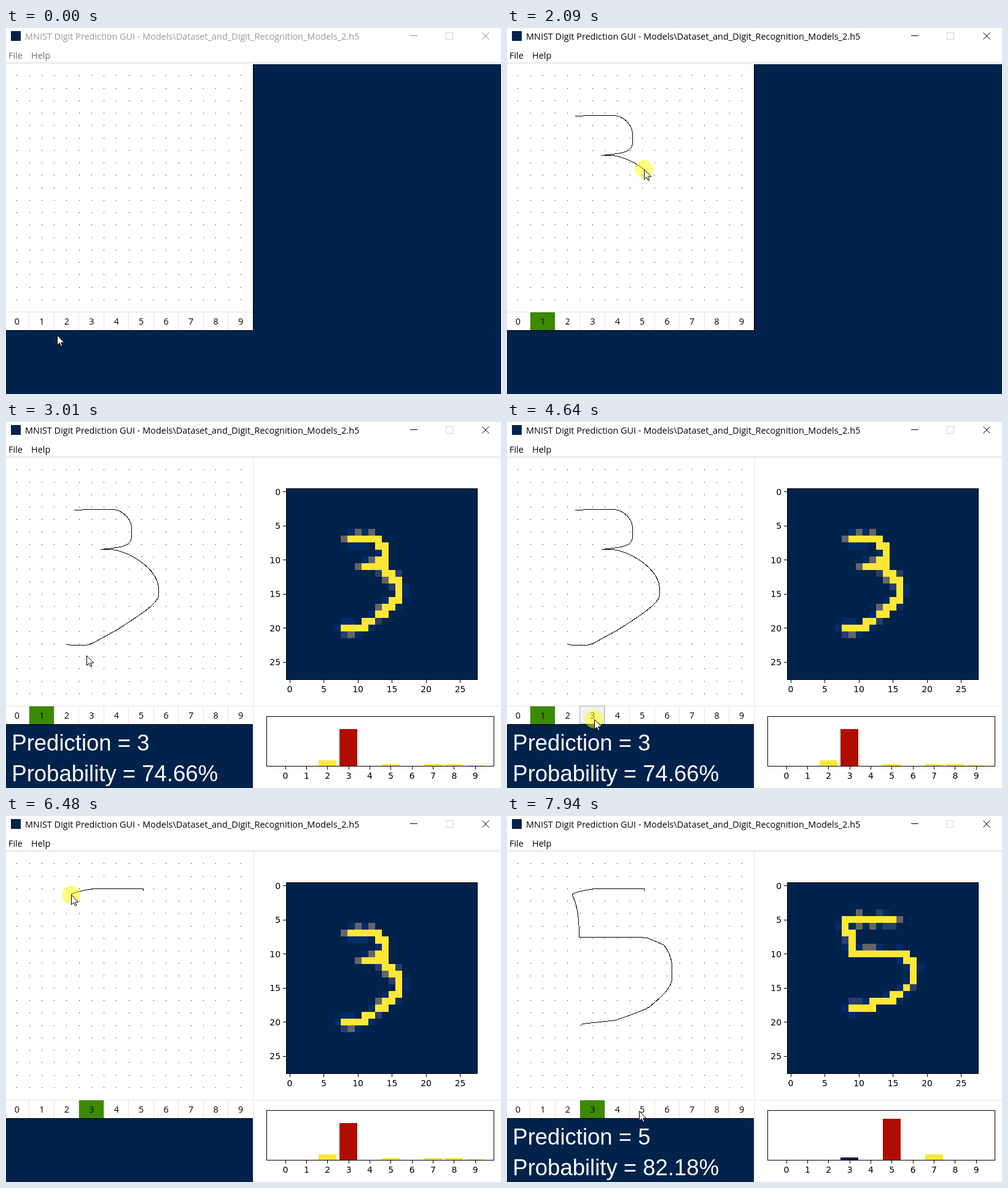
An HTML page for the animation above (8000 ms loop, 806x596 px).

```html
<!DOCTYPE html>
<html lang="en">
<head>
<meta charset="utf-8">
<title>Digit Prediction</title>
<style>
html, body { margin: 0; width: 100%; height: 100%; overflow: hidden; background: #fff; }
svg { display: block; width: 806px; height: 596px; }
.crisp { shape-rendering: crispEdges; }
.ui { font: 14.45px "Open Sans", "Noto Sans", sans-serif; }
.plot text { font: 13.9px "DejaVu Sans", sans-serif; }
.result { font: 36.5px "Liberation Sans", Arial, sans-serif; fill: #fff; }
</style>
</head>
<body>
<svg viewBox="0 0 806 596">
  <rect width="806" height="596" fill="#fff"/>
  <rect y="55" width="806" height="4" fill="#f0f0f0"/>
  <rect y="59" width="806" height="537" fill="#00224b"/>
  <rect class="crisp" x="8" y="5" width="16" height="16" fill="#00224b"/>
  <g class="ui">
    <text id="caption" x="31" y="19">MNIST Digit Prediction GUI - Models\Dataset_and_Digit_Recognition_Models_2.h5</text>
    <g id="menu"><text x="4" y="50">File</text><text x="41" y="50">Help</text></g>
  </g>
  <g id="buttons" fill="none">
    <path class="crisp" d="M658 12.5h12"/>
    <path d="M775.5 7.5l11 11m0 -11l-11 11"/>
  </g>
  <rect class="crisp" x="716.5" y="7.5" width="11" height="11" fill="none" stroke="#d4d4d4"/>
  <g class="crisp">
    <rect y="59" width="403" height="434" fill="#000"/>
    <rect y="59" width="402" height="433" fill="#fff"/>
    <g id="dots"></g>
    <path id="grid" fill="none" stroke="#e3e3e3"/>
    <rect id="chosen" y="463" width="40" height="29" fill="#3c8a00"/>
    <rect id="pressed" y="462.5" width="40" height="29" fill="#f0f0f0" stroke="#b0b0b0"/>
  </g>
  <g id="labels" class="ui"></g>
  <g id="panel" class="plot">
    <g class="crisp">
      <rect x="402" y="59" width="404" height="537" fill="#f0f0f0"/>
      <rect x="404" y="59" width="402" height="403" fill="#fff"/>
      <rect x="404" y="464" width="402" height="132" fill="#fff"/>
      <rect x="457" y="109" width="311" height="311" fill="#00224b"/>
      <g id="heat"></g>
      <g id="bars"></g>
      <path id="ticks" fill="none" stroke="#000"/>
    </g>
    <g id="tickText"></g>
  </g>
  <g id="result" class="result">
    <text id="guess" x="9.3" y="535"></text>
    <text id="chance" x="9.3" y="585"></text>
  </g>
  <g id="ink" class="crisp" fill="none" stroke="#000" transform="translate(.5 .5)"></g>
  <g id="pointer">
    <circle id="halo" r="15" fill="#ff0" opacity=".5"/>
    <path d="M.5 .5V16.5L4.2 13L6.8 18.4L9 17.4L6.5 12.2H11.8Z" fill="#fff" stroke="#000"/>
  </g>
</svg>
<script>
const LOOP = 8000, BEAT = 77;
const YELLOW = "#ffe737", NAVY = "#00224b", RED = "#b10c00";
const $ = id => document.getElementById(id);
const set = (id, name, value) => $(id).setAttribute(name, value);
const show = (id, on) => set(id, "visibility", on ? "visible" : "hidden");
const fillWith = (id, n, make) => { $(id).innerHTML = Array.from({ length: n }, (_, i) => make(i)).join(""); };
const rect = (x, y, w, h, fill = "#000") =>
  `<rect x="${x}" y="${y}" width="${w}" height="${h}" fill="${fill}"/>`;
const label = (x, y, s, anchor = "middle") =>
  `<text x="${x}" y="${y}" text-anchor="${anchor}">${s}</text>`;
const within = (t, [a, b]) => t >= a && t < b;
const cellLeft = i => Math.floor(40.5 * i - 2.7);

// Each result's heat map is its own stroke fitted into the box of cells.
const THREE = {
  digit: 3, chance: "74.66%", label: 1, cells: [8.5, 7.5, 16.5, 20.5],
  bars: { 1: .005, 2: .115, 3: .7466, 5: .042, 7: .042, 8: .042, 9: .015 }
};
const FIVE = {
  digit: 5, chance: "82.18%", label: 3, cells: [8.5, 5.5, 18.5, 18.5],
  bars: { 3: .05, 5: .8218, 7: .115 }
};

// Pointer moves: start, end, path from the last point, digit being drawn.
let end = "83 500";
const MOVES = [
  [80, 310, "L41 488L48 480"],
  [860, 1170, "Q80 160 113 142"],
  [1400, 1400, "L111 143"],
  [1477, 1860, "L136 142H172C190 142 204 158 204 173V186C204 203 184 204 154 207", 3],
  [2010, 2090, "H172C192 210 210 220 223 230", 3],
  [2165, 2630, "C238 242 248 256 248 272V282C246 296 216 315 180 338L140 360L130 363H108L99 362", 3],
  [2857, 3010, "L131 380"],
  [3088, 3320, "L158 445"],
  [3700, 4330, "Q205 500 178 498T142 484"],
  [4880, 5640, "Q160 290 204 173"],
  [5720, 5950, "L223 121"],
  [6030, 6480, "V118H150C131 118 118 122 107 126L106 128", 5],
  [6560, 7330, "C114 145 117 165 117 197H214L228 198L254 209C263 218 268 232 268 246V266C266 282 248 296 232 310C215 320 195 325 177 332L150 335L122 338L119 341", 5],
  [7490, 7940, "L215 480"]
].map(([from, to, d, digit]) => {
  const path = document.createElementNS("http://www.w3.org/2000/svg", "path");
  path.setAttribute("d", `M${end}${d}`);
  $("ink").append(path);
  const length = path.getTotalLength();
  const at = s => { const p = path.getPointAtLength(s * length); return [p.x, p.y]; };
  end = at(1).join(" ");
  return { from, to, path, length, at, digit, steps: Math.round((to - from) / BEAT) + 1 };
});
const PRESSES = [[540, 630], [1477, 2780], [4640, 4710], [6030, 7410]];

function buildStatic() {
  const dot = i => Math.floor(17.8 + 20.25 * i);
  fillWith("dots", 361, i => rect(dot(i % 19), dot(Math.floor(i / 19)) + 60, 1, 1));
  fillWith("labels", 10, i => label(18 + 40.45 * i, 483, i));
  let lines = "M0 462.5H402";
  for (let i = 1; i < 10; i++) lines += `M${cellLeft(i) + .5} 462V492`;
  set("grid", "d", lines);

  let d = "M456.5 108.5H767.5V419.5H456.5ZM424.5 479.5H794.5V560.5H424.5Z", text = "";
  for (let v = 0; v <= 25; v += 5) {
    const x = 462 + v * 11.1, y = 113.5 + v * 11.1;
    d += `M${Math.floor(x) + .5} 420v5M456 ${Math.floor(y) + .5}h-5`;
    text += label(x, 440, v) + label(447, y + 5, v, "end");
  }
  for (let i = 0; i < 10; i++) {
    const x = 455 + 34.35 * i;
    d += `M${Math.floor(x) + .5} 561v5`;
    text += label(x, 581, i);
  }
  set("ticks", "d", d);
  $("tickText").innerHTML = text;
}

// Stroke samples scaled from their bounding box to heat map cells.
function cellPoints({ digit, cells: [x0, y0, x1, y1] }) {
  const pts = MOVES.filter(m => m.digit === digit).flatMap(m => {
    const n = Math.ceil(m.length / 3);
    return Array.from({ length: n + 1 }, (_, i) => m.at(i / n));
  });
  const fit = (axis, lo, hi) => {
    const v = pts.map(p => p[axis]), min = Math.min(...v), max = Math.max(...v);
    return v.map(a => lo + (a - min) / (max - min) * (hi - lo));
  };
  const ys = fit(1, y0, y1);
  return fit(0, x0, x1).map((x, i) => [x, ys[i]]);
}

const noise = n => { const v = Math.sin(n * 12.9898) * 43758.5453; return v - Math.floor(v); };

function heatColor(distance, seed) {
  if (distance < .58) return YELLOW;
  const v = noise(seed);
  if (distance > 1.1 || v < .3) return "";
  return v < .65 ? "#002b68" : v < .86 ? "#293e6c" : "#666368";
}

let shown = null;
function drawResult(r) {
  if (!r || r === shown) return;
  shown = r;
  const pts = cellPoints(r);
  const px = c => Math.round(456.5 + 11.1 * c), py = c => Math.round(107.6 + 11.1 * c);
  fillWith("heat", 784, i => {
    const col = i % 28, row = Math.floor(i / 28);
    const near = Math.min(...pts.map(([x, y]) => Math.hypot(x - col - .5, y - row - .5)));
    const fill = heatColor(near, i);
    return fill && rect(px(col), py(row), px(col + 1) - px(col), py(row + 1) - py(row), fill);
  });
  fillWith("bars", 10, i => {
    if (!r.bars[i]) return "";
    const h = Math.ceil(r.bars[i] * 81 + .5);
    const fill = i === r.digit ? RED : i === r.label ? NAVY : YELLOW;
    return rect(Math.floor(440.8 + 34.35 * i), 561 - h, 29, h, fill);
  });
  $("guess").textContent = "Prediction = " + r.digit;
  $("chance").textContent = "Probability = " + r.chance;
}

function drawPointer(t) {
  let tip = [83, 500];
  const digit = t < 6030 ? 3 : 5;
  for (const m of MOVES) {
    const begun = t >= m.from;
    const gap = (m.to - m.from) / (m.steps - 1) || 1;
    const share = Math.min(1, (Math.floor((t - m.from) / gap + 1e-6) + 1) / m.steps);
    if (begun) tip = m.at(share).map(Math.round);
    m.path.setAttribute("visibility", begun && m.digit === digit ? "visible" : "hidden");
    m.path.setAttribute("stroke-dasharray", `${Math.max(0, share * m.length)} 9999`);
  }
  set("pointer", "transform", `translate(${tip})`);
  show("halo", PRESSES.some(p => within(t, p)));
}

function render(t) {
  const active = t >= 540;
  set("caption", "fill", active ? "#000" : "#999");
  set("menu", "fill", active ? "#000" : "#6d6d6d");
  set("buttons", "stroke", active ? "#000" : "#888");

  set("chosen", "x", cellLeft(t < 4710 ? 1 : 3) + 1);
  show("chosen", t >= 630);
  set("pressed", "x", cellLeft(t < 2000 ? 1 : 3) + .5);
  show("pressed", within(t, PRESSES[0]) || within(t, PRESSES[2]));

  const result = t >= 7490 ? FIVE : t >= 2857 ? THREE : null;
  drawResult(result);
  show("panel", result);
  show("result", result && !within(t, [6030, 7490]));
  drawPointer(t);
}

buildStatic();
const start = performance.now();
function tick() {
  render((performance.now() - start) % LOOP);
  requestAnimationFrame(tick);
}
tick();
</script>
</body>
</html>
```
